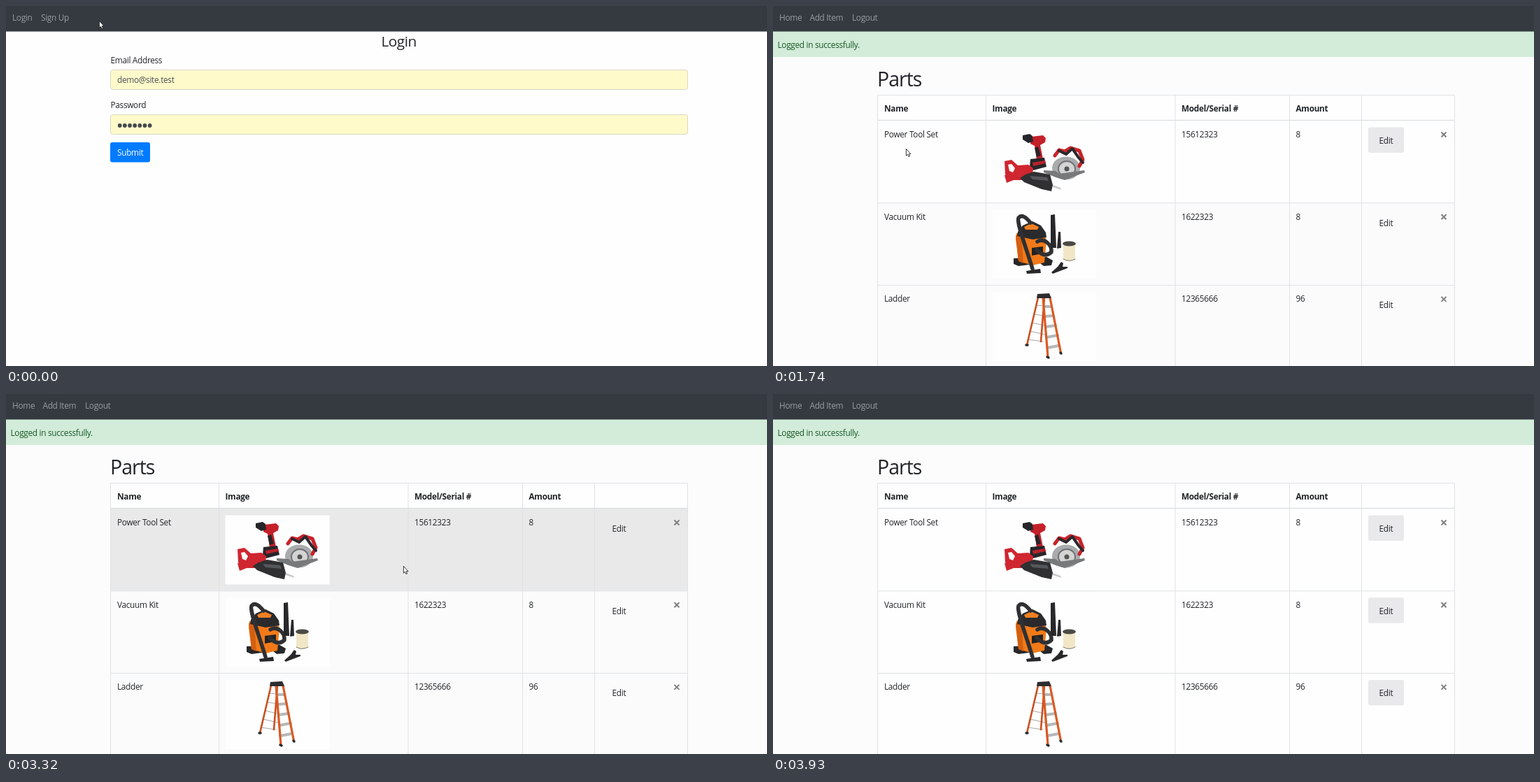
These frames come from a looping animation (1088x515 px, 4.46 s). An HTML page:

```html
<!DOCTYPE html>
<html lang="en">
<head>
<meta charset="utf-8">
<title>Parts login</title>
<style>
  html, body { margin: 0; width: 100%; height: 100%; overflow: hidden; background: #fefefe; }
  svg { display: block; width: 100vw; height: 100vh; }
  text { font: 11.8px "Open Sans", "Noto Sans", sans-serif; letter-spacing: -.025em; fill: #212529; }
  .nav { fill: #9a9da0; }
  .bold { font-weight: 700; }
  .field { fill: #fffaca; stroke: #d9d7c8; }
  .value { fill: #495057; }
  .grid { fill: none; stroke: #dee2e6; }
  .round { fill: none; stroke-linecap: round; stroke-linejoin: round; }
</style>
</head>
<body>
<svg viewBox="0 0 1088 515">
  <defs>
    <g id="tools">
      <path fill="#c4202a" d="M369 187l17-2 4 4-1 6-7 4 4 20-9 1-3-20-6-3z"/>
      <path fill="#26262a" d="M357 185l10-2 4 3 1 8-7 2-8-5zM368 219l20-2 3 13-19 5-5-5zM374 203l5-2 4 13-6 2z"/>
      <path fill="#b8232b" d="M371 224l18-3 1 4-18 4z"/>
      <ellipse cx="419" cy="232" rx="20" ry="16.500" fill="#a9abad"/>
      <ellipse cx="420" cy="233" rx="12" ry="11" fill="#d4d4d4" stroke="#6f7173" stroke-width="2"/>
      <circle cx="420" cy="233" r="3.500" fill="#555"/>
      <path class="round" stroke="#c9222a" stroke-width="5" d="M403 214l6-8 8 2 8-5 13 4 5 13-5 9"/>
      <path class="round" stroke="#29292c" stroke-width="4" d="M409 207l10 5 9-8 9 13 6 7"/>
      <path fill="#77797b" d="M387 235l17 1 5 4 36-5 1 3-29 11-13-4-17-7z"/>
      <path fill="#cf2630" d="M331 222l10-2 9 8 15-1 7 5-1 10-10 7-22 0-7-8zM331 242l9-1 4 8-10 4z"/>
      <path fill="#fff" d="M336 227l5-1 5 6-3 6-5-2z"/>
      <path fill="#303033" d="M361 241l12-4 23 4 4 15-2 9-14-3-25-10-6-6z"/>
      <path fill="#55575a" d="M367 243l25 2 2 5-23-2z"/>
      <path fill="#c9cacc" d="M400 256l11 4 1 3-12-4z"/>
    </g>
    <g id="vacuum">
      <path fill="#27272a" d="M344 361l47-2 9 5-2 7-11 1-5-4-31 4-7-3z"/>
      <path fill="#f27a18" d="M348 325l41 3 2 8-3 31-17 4-20-6-4-31z"/>
      <path fill="#d45f10" d="M347 328l4 37 7 3-3-40z"/>
      <path fill="#2a2a2d" d="M350 323l7-9 14-6 12 6 7 10 1 7-20 3-22-5z"/>
      <path fill="#f08023" d="M359 316l10-5 11 5-2 4-17 0z"/>
      <path fill="#222" d="M370 346l16-2 0 10-16 3z"/>
      <path class="round" stroke="#303033" stroke-width="5.500" d="M368 310Q357 296 351 303C348 310 361 343 371 376M378 337C388 331 399 342 398 352Q389 361 377 349"/>
      <path fill="#28282b" d="M362 379l20-3 1 6-20 1zM397 299l6-1 2 48-8 0zM408 323l3 0 1 23-6 1zM398 381l9-8 5-7 3 2-1 5 7 0 0 2-21 8z"/>
      <path fill="#f1e7c6" d="M415 341h17v21q-8 5-17 0z"/>
      <ellipse cx="423.500" cy="340" rx="9.500" ry="3.500" fill="#4b4a46"/>
      <path class="round" stroke="#77736a" d="M415 362q8 5 17 0"/>
    </g>
    <g id="ladder" class="round">
      <path stroke="#aaa" stroke-width="1.200" d="M376 428l11 1M373 441l15 2M370 453l18 4M367 465l22 5M364 477l22 3"/>
      <path stroke="#c9501f" stroke-width="2.600" d="M379 417L363 485M388 417L383 480"/>
      <path stroke="#b5b7b8" stroke-width="4" d="M388 430h10M389 444l12-1M390 459l14-2M391 474l16-3M392 489l16-3"/>
      <path stroke="#db5a22" stroke-width="3.200" d="M386 417L393 502M396 417L411.500 496"/>
      <path stroke="#2d2d2f" stroke-width="3.500" d="M362 485l2 0M392 502l2 1M411 496l1 1"/>
      <path fill="#2d2d2f" d="M378 412l17-1 3 7-21 0z"/>
    </g>
  </defs>

  <g id="login">
    <rect width="1088" height="515" fill="#fefefe"/>
    <text x="536.500" y="57.500" style="font-size:20.800px">Login</text>
    <text x="149.500" y="81.500">Email Address</text>
    <rect class="field" x="149.500" y="91.500" width="825" height="28" rx="3"/>
    <text class="value" x="159" y="110">demo@site.test</text>
    <text x="149.500" y="145.500">Password</text>
    <rect class="field" x="149.500" y="155.500" width="825" height="28" rx="3"/>
    <path class="round" stroke="#45494d" stroke-width="5.800" stroke-dasharray="0 7.150" d="M162.700 171h43.500"/>
    <rect id="ring" x="148" y="194" width="59" height="30.500" rx="4" fill="none" stroke="#80bdff" stroke-width="2.400"/>
    <rect id="submit" x="149" y="195" width="57" height="28.500" rx="3"/>
    <text x="159" y="214" style="fill:#fff">Submit</text>
  </g>

  <g id="parts">
    <rect width="1088" height="515" fill="#fcfcfc"/>
    <rect y="36" width="1088" height="37" fill="#d3ecd9"/>
    <text x="6.500" y="60" style="fill:#155724">Logged in successfully.</text>
    <text x="149" y="115" style="font-size:28.500px;letter-spacing:-.035em">Parts</text>
    <rect x="150" y="127" width="825" height="37" fill="#fefefe"/>
    <g id="rows"></g>
    <path class="grid" d="M149.500 520V127.500H974.500V520M304.500 127V520M575 127V520M738.500 127V520M841.500 127V520M149 281.800H975M149 399.500H975"/>
    <path class="grid" stroke-width="1.500" d="M149 163.500H975"/>
    <text class="bold" x="159" y="151">Name</text>
    <text class="bold" x="313.500" y="151">Image</text>
    <text class="bold" x="584" y="151">Model/Serial #</text>
    <text class="bold" x="747.500" y="151">Amount</text>
  </g>

  <rect width="1088" height="36.500" fill="#343a40"/>
  <g id="guestNav">
    <text class="nav" x="9" y="21">Login</text>
    <text class="nav" x="50" y="21">Sign Up</text>
  </g>
  <g id="userNav">
    <text class="nav" x="9" y="21">Home</text>
    <text class="nav" x="52.500" y="21">Add Item</text>
    <text class="nav" x="113" y="21">Logout</text>
  </g>

  <g id="cursor" fill="#fff" stroke="#222" stroke-width=".9" stroke-linejoin="round">
    <path id="arrow" d="M.4.4V10.200L2.500 8.300 4 11.600 5.600 10.900 4.200 7.700H7Z"/>
    <path id="hand" d="M-1 8V1.200Q0-.6 1 1.200V5Q2 4 3 5.400Q4 4.600 4.700 6Q6 5.400 6 7V9.500Q6 12 4.600 13.600H0Q-2 11-3.600 8.600Q-3.600 7-2 7.800L-1 8.800Z"/>
  </g>
</svg>
<script>
const LOOP = 4460, STEP = 60, FOCUS = 1620, SUBMITTED = 1680, LOGGED_IN = 1740;
const $ = id => document.getElementById(id);
const show = (node, on) => { node.style.display = on ? '' : 'none'; };

// Each row: name, picture, serial, amount, time its button gets a background
const items = [
  ['Power Tool Set', 'tools', '15612323', 8, LOGGED_IN],
  ['Vacuum Kit', 'vacuum', '1622323', 8, 3500],
  ['Ladder', 'ladder', '12365666', 96, 3560],
];
const ROW_TOP = 164, ROW_HEIGHT = 117.7;

$('rows').innerHTML = items.map(([name, picture, serial, amount], i) => {
  const y = ROW_TOP + i * ROW_HEIGHT;
  return `<g>
    <rect class="band" x="150" y="${y}" width="824.500" height="${ROW_HEIGHT}"/>
    <rect x="313.500" y="${y + 9.500}" width="149" height="99" fill="#fefefe"/>
    <use href="#${picture}"/>
    <text x="159" y="${y + 24}">${name}</text>
    <text x="584" y="${y + 24}">${serial}</text>
    <text x="747.500" y="${y + 24}">${amount}</text>
    <rect class="button" x="851" y="${y + 9.500}" width="51" height="36.500" rx="3" fill="#e9e9eb"/>
    <text x="866.500" y="${y + 33}">Edit</text>
    <path class="close" d="M955.500 ${y + 16.500}l7 7m0-7l-7 7" stroke-width="2"/>
  </g>`;
}).join('');
const rows = [...$('rows').children];

// Cursor route: time, x, y
const route = [
  [0, 133, 21], [120, 138, 40], [300, 190, 165], [420, 207, 222], [570, 192, 216],
  [690, 187, 215], [1130, 187, 215], [1250, 190, 204], [2200, 190, 204],
  [2380, 205, 165], [2560, 229, 110], [2760, 124, 81], [2820, 121, 82],
  [2940, 165, 87], [3000, 228, 95], [3060, 272, 113], [3320, 568, 246],
  [3380, 690, 310], [3440, 860, 385], [3500, 978, 436], [3560, 994, 446],
  [3680, 1024, 456], [3870, 1023, 514], [3930, 1025, 522], [LOOP, 1025, 522],
];

// The pointer advances in short ticks, as in a screen recording
function pointerAt(time) {
  const next = route.findIndex(key => key[0] > time);
  const [t0, x0, y0] = route[next - 1], [t1, x1, y1] = route[next];
  const part = Math.floor((time - t0) / STEP) * STEP / (t1 - t0);
  return [x0 + (x1 - x0) * part, y0 + (y1 - y0) * part];
}

function draw(time) {
  const [x, y] = pointerAt(time);
  const loggedIn = time >= LOGGED_IN;
  const onSubmit = x > 149 && x < 206 && y > 195 && y < 223;
  const hand = onSubmit && time < SUBMITTED;
  $('cursor').setAttribute('transform', `translate(${x} ${y})`);
  show($('hand'), hand);
  show($('arrow'), !hand);
  show($('login'), !loggedIn);
  show($('guestNav'), !loggedIn);
  show($('parts'), loggedIn);
  show($('userNav'), loggedIn);
  show($('ring'), time >= FOCUS);
  $('submit').setAttribute('fill', onSubmit ? '#0069d9' : '#007bff');

  const hovered = time > 2820 && x < 985 ? Math.floor((y - ROW_TOP) / ROW_HEIGHT) : -1;
  rows.forEach((row, i) => {
    const touched = time >= items[i][4], over = i === hovered;
    row.querySelector('.band').setAttribute('fill', over ? '#e9e9e9' : touched ? '#fefefe' : '#fbfbfb');
    row.querySelector('.close').setAttribute('stroke', over && x > 940 ? '#111' : '#7f7f7f');
    show(row.querySelector('.button'), touched && !over);
  });
}

function tick() {
  draw(performance.now() % LOOP);
  requestAnimationFrame(tick);
}
tick();
</script>
</body>
</html>
```
